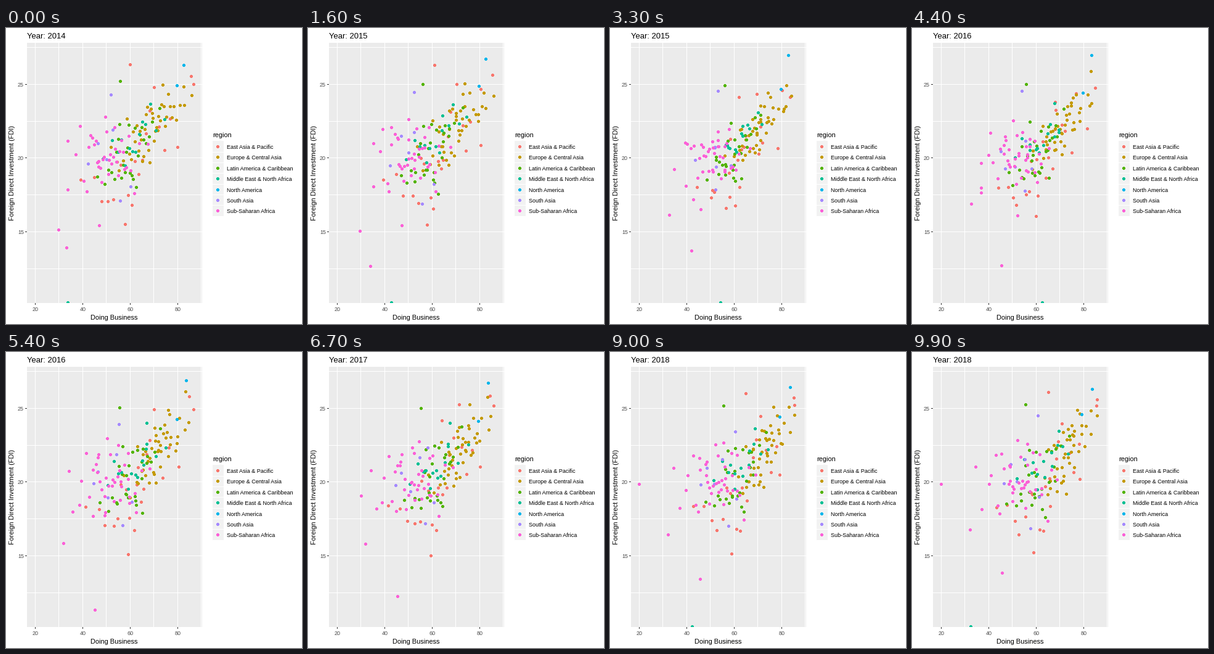
Animation of 480 by 480 pixels, one loop 10 s. Source, as a matplotlib script:

```python
import numpy as np
import matplotlib.pyplot as plt
from matplotlib.animation import FuncAnimation
from matplotlib.patches import Rectangle

SIZE, FRAMES = 480, 100
KEYS = [0, 25, 49, 74, 99]      # frames at which each year is reached
FLOOR = 445                     # panel bottom, where minus infinity lands
rng = np.random.default_rng(14)

plt.rcParams["font.family"] = "Liberation Sans"
fig = plt.figure(figsize=(SIZE / 72, SIZE / 72), dpi=72, facecolor="white")
ax = fig.add_axes([0, 0, 1, 1])
ax.set(xlim=(0, SIZE), ylim=(SIZE, 0))
ax.axis("off")


def box(x, y, w, h, color):
    patch = Rectangle((x, y), w, h, facecolor=color, lw=0, antialiased=False, zorder=1)
    return ax.add_patch(patch)


def label(x, y, s, size, color="black", **kw):
    return ax.text(x, y, s, fontsize=size, color=color, **kw)


def dots(xy, colors):
    xy = np.asarray(xy) + 0.5
    return ax.scatter(xy[:, 0], xy[:, 1], s=4.3 ** 2, c=colors, lw=0,
                      antialiased=False, zorder=3)


names, hues, paths, colors = [], [], [], []


def spread(n, sd):
    """Evenly ranked bell-shaped offsets in random order."""
    return sd * np.sort(rng.normal(0, 1, (99, n)), axis=1).mean(axis=0)[rng.permutation(n)]


def cloud(n, x, y, sd, slope, rest, pull=0.02):
    """Sloped cloud that wobbles yearly and changes places once, in 2016."""
    dx = spread(n, sd)
    base = np.column_stack([x + dx, y + slope * dx + spread(n, rest)])
    base = base[np.argsort(base[:, 0] + rng.normal(0, sd / 2, n))]
    years = []
    for k in range(5):
        pts = np.roll(base, k > 1, axis=0)
        if k:
            pts[:, 0] += (290 - pts[:, 0]) * pull * k
            pts += rng.normal(0, (3, 9), pts.shape)
        years.append(pts)
    return np.stack(years, axis=1)


def region(name, hue, tracks, *shape, **kw):
    """Tracks follow single outliers: x, y for each year."""
    parts = [np.array(tracks, float).reshape(-1, 5, 2)]
    if shape:
        parts.append(cloud(*shape, **kw))
    names.append(name)
    hues.append(hue)
    paths.extend(parts)
    colors.extend([hue] * sum(map(len, parts)))


region("East Asia & Pacific", "#F8766D",
       [[201, 59, 207, 60, 213, 216, 219, 70, 221, 65],
        [304, 91, 266, 104, 305, 95, 300, 84, 299, 87]],
       21, 211, 211, 48, -1.1, 46)
region("Europe & Central Asia", "#C49A00",
       [[288, 95, 284, 110, 291, 60, 291, 78, 290, 95]],
       41, 236, 160, 30, -0.75, 25, pull=0.08)
region("Latin America & Caribbean", "#53B400",
       [[185, 86, 187, 94, 184, 90, 183, 91, 184, 85]],
       27, 199, 204, 25, -0.9, 31)
region("Middle East & North Africa", "#00C094",
       [[100, FLOOR, 155, FLOOR, 226, 170, 201, 200, 95, FLOOR]],
       14, 207, 180, 29, -0.75, 20)
region("North America", "#00B6EB",
       [[288, 60, 288, 44, 292, 44, 292, 52, 292, 60],
        [277, 93, 277, 95, 277, 108, 276, 113, 275, 101]])
region("South Asia", "#A58AFF",
       [[170, 108, 173, 102, 179, 102, 200, 175, 204, 103]],
       6, 168, 225, 29, 0.3, 45)
region("Sub-Saharan Africa", "#FB61D7",
       [[98, 356, 103, 403, 189, 278, 46, 215, 47, 214],
        [85, 327, 84, 330, 119, 250, 120, 241, 125, 214],
        [150, 216, 149, 228, 144, 426, 145, 385, 146, 358],
        [100, 183, 109, 189, 93, 310, 93, 311, 94, 288],
        [151, 320, 152, 320, 102, 193, 102, 191, 103, 186]],
       37, 165, 208, 30, -0.1, 31)

path = np.concatenate(paths)

# panel, grid and axes
panel = box(34, 24, 284, 422, "#EBEBEB")
for v in range(20, 91, 10):
    x = int(47 + 3.85 * (v - 20))
    box(x, 24, 1, 422, "white")
    if v % 20 == 0:
        box(x, 446, 1, 3, "#333333")
        label(x + 0.5, 459, v, 9, "#4D4D4D", ha="center")
for v in np.arange(12.5, 28, 2.5):
    y = round(91 + 23.9 * (25 - v))
    box(34, y, 284, 1, "white")
    if v % 5 == 0:
        box(31, y, 3, 1, "#333333")
        label(29, y + 4, int(v), 9, "#4D4D4D", ha="right")
label(175.5, 473, "Doing Business", 11, ha="center")
label(15, 234.5, "Foreign Direct Investment (FDI)", 11, rotation=90,
      ha="right", va="center")
title = label(34, 17, "", 13)

# legend
label(335, 177, "region", 11)
box(335, 183, 18, 122, "#F2F2F2")
for i in range(1, 7):
    box(335, round(183.4 + 17.28 * i), 18, 1, "white")
rows = [round(192 + 17.4 * i) for i in range(7)]
dots([(343, y) for y in rows], hues)
for y, name in zip(rows, names):
    label(358, y + 4, name, 9)

points = dots(path[:, 0], colors)
points.set_clip_path(panel)


def update(i):
    k = min(np.searchsorted(KEYS, i, side="right") - 1, 3)
    t = (i - KEYS[k]) / (KEYS[k + 1] - KEYS[k])
    a, b = path[:, k], path[:, k + 1]
    xy = a + (b - a) * t
    low = (a[:, 1] == FLOOR) & (t < 1) | (b[:, 1] == FLOOR) & (t > 0)
    xy[low, 1] = FLOOR
    points.set_offsets(np.round(xy) + 0.5)
    title.set_text(f"Year: {round(2014 + 4 * i / (FRAMES - 1))}")
    return points, title


anim = FuncAnimation(fig, update, frames=FRAMES, interval=100,
                     init_func=lambda: update(0), repeat=True, repeat_delay=0)
plt.show()
```
